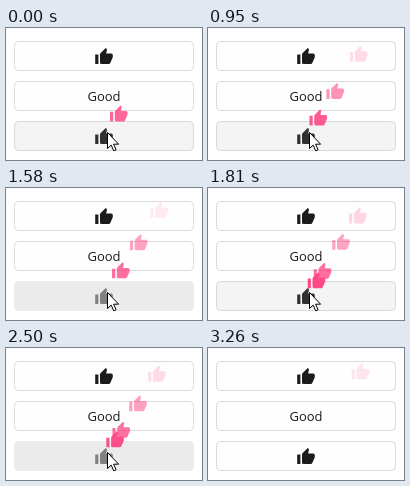
Write an HTML page that moves like this. It is 196x132 px and loops after 3540 ms.

```html
<!DOCTYPE html>
<html lang="en">
<head>
<meta charset="utf-8">
<title>Floating reactions</title>
<style>
  html, body { margin: 0; width: 100%; height: 100%; overflow: hidden; background: #fff; }
  svg { display: block; width: 196px; height: 132px; }
  .button { fill: #fefefe; stroke: #d9d9d9; }
  .icon { fill: #1b1b1b; }
  .hover .button { fill: #f4f4f4; }
  .hover .icon { fill: #303030; }
  .pressed .button { fill: #ebebeb; stroke: #ebebeb; }
  .pressed .icon { fill: #808080; }
  .floating { fill: #ff4081; }
  text { font: 13px "Open Sans", "Noto Sans", sans-serif; fill: #1b1b1b; text-anchor: middle; }
</style>
</head>
<body>
<svg viewBox="0 0 196 132">
  <defs>
    <path id="thumb" transform="scale(.8) translate(-12 -11)" d="M23 10C23 8.89 22.1 8 21 8H14.68L15.64 3.43C15.66 3.33 15.67 3.22 15.67 3.11C15.67 2.7 15.5 2.32 15.23 2.05L14.17 1L7.59 7.58C7.22 7.95 7 8.45 7 9V19A2 2 0 0 0 9 21H18C18.83 21 19.54 20.5 19.84 19.78L22.86 12.73C22.95 12.5 23 12.26 23 12V10M1 21H5V9H1Z"/>
    <rect id="box" x="8.5" y="-14.5" width="179" height="29" rx="4"/>
  </defs>
  <g transform="translate(0 28)">
    <use href="#box" class="button"/>
    <use href="#thumb" x="98" class="icon"/>
  </g>
  <g transform="translate(0 68)">
    <use href="#box" class="button"/>
    <text x="98" y="5">Good</text>
  </g>
  <g id="target" transform="translate(0 108)">
    <use href="#box" class="button"/>
    <use href="#thumb" x="98" class="icon"/>
  </g>
  <g id="reactions"></g>
  <path id="cursor" d="M.5 .5V16.5L4.2 13.1L6.7 18.8L9.1 17.8L6.6 12.2H11.6Z" fill="#fff" stroke="#000"/>
</svg>
<script>
  const LOOP = 3540, LAST = 3260, STEP = LAST / 56;
  const LIFE = 850, PRESS = 90;
  const START = { x: 108, y: 93 }, END = { x: 154.5, y: 20 };
  const clicks = [-177, 235, 554, 811, 1130, 1359, 1597, 1748, 2011, 2226, 2361, 2523];

  const target = document.getElementById("target");
  const cursor = document.getElementById("cursor");
  const layer = document.getElementById("reactions");
  const thumbs = clicks.map(() => {
    const thumb = document.createElementNS("http://www.w3.org/2000/svg", "use");
    thumb.setAttribute("href", "#thumb");
    thumb.setAttribute("class", "floating");
    return layer.appendChild(thumb);
  });

  const ease = u => (1 - Math.cos(Math.PI * u)) / 2;
  const mix = (a, b, p) => a + (b - a) * p;
  const clamp = v => Math.max(0, Math.min(1, v));
  const place = (el, x, y) => el.setAttribute("transform", `translate(${x} ${y})`);

  function draw(time) {
    // The picture advances in even steps, then rests until the loop restarts.
    const t = Math.min(56, Math.floor((time + 1) / STEP)) * STEP;

    thumbs.forEach((thumb, i) => {
      const u = (t - clicks[i]) / LIFE;
      const alive = u >= 0 && u < 1;
      thumb.style.display = alive ? "" : "none";
      if (!alive) return;
      const p = ease(u);
      place(thumb, mix(START.x, END.x, p), mix(START.y, END.y, p));
      thumb.style.opacity = 1 - u;
    });

    const exit = clamp((t - 2680) / 320);
    const y = 104 + 30 * exit * exit;
    place(cursor, 101, y);
    const pressed = clicks.some(c => t >= c - PRESS && t < c);
    target.setAttribute("class", pressed ? "pressed" : y < 123 ? "hover" : "");
  }

  const origin = performance.now();
  function tick() {
    draw((performance.now() - origin) % LOOP);
    requestAnimationFrame(tick);
  }
  tick();
</script>
</body>
</html>
```
